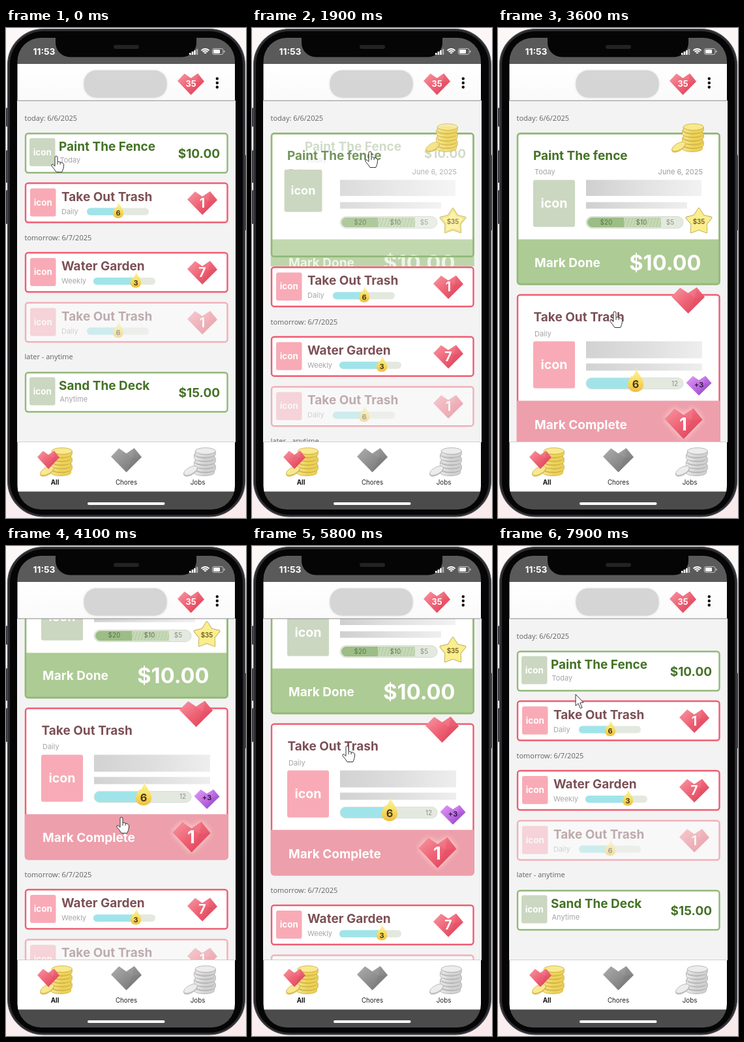
An HTML page with a canvas for the animation above (8 s loop, 368 by 750 pixels).

```html
<!DOCTYPE html>
<html lang="en">
<head>
<meta charset="utf-8">
<title>Chores app</title>
<style>
html, body { margin: 0; width: 100%; height: 100%; overflow: hidden; background: #fbf5f6; }
canvas { display: block; width: 368px; height: 750px; }
</style>
</head>
<body>
<canvas id="stage"></canvas>
<script>
const LOOP = 8000;
const canvas = document.getElementById('stage');
const ctx = canvas.getContext('2d');
const dpr = window.devicePixelRatio || 1;
canvas.width = 368 * dpr;
canvas.height = 750 * dpr;

const INTER = 'Inter, sans-serif';
const OPEN = '"Open Sans", sans-serif';
const RED = { light: '#f58a97', mid: '#ee6275', dark: '#e0485f' };
const GREY = { light: '#a6a6a6', mid: '#8f8f8f', dark: '#787878' };
const PURPLE = { light: '#d78ff0', mid: '#bd6ce2', dark: '#9a4ccb' };
const GOLD = { top: '#f8e98f', face: '#edd255', line: '#cbab45' };
const SILVER = { top: '#ececec', face: '#d2d2d2', line: '#ababab' };
const GREEN = { border: '#92b878', icon: '#cbd7c1', title: '#447226', band: '#adcb94' };
const PINK = { border: '#ee5d72', icon: '#f8abb6', title: '#7c5056', band: '#ed9fab' };
const PAGE = '#f3f3f3';
const TITLE = 19, BIG = 32.6;

// ---------- timing ----------
const clamp = v => Math.max(0, Math.min(1, v));
const mix = (a, b, p) => a + (b - a) * p;
const easeOut = p => 1 - (1 - p) * (1 - p);
const smooth = p => p * p * (3 - 2 * p);
const linear = p => p;

function track(t, keys, ease) {
  for (let i = 1; i < keys.length; i++) {
    const [t0, a] = keys[i - 1], [t1, b] = keys[i];
    if (t <= t1) return mix(a, b, ease(clamp((t - t0) / (t1 - t0))));
  }
  return keys[keys.length - 1][1];
}

const jobOpen = t => track(t, [[1700, 0], [2100, 1], [7250, 1], [7650, 0]], easeOut);
const choreOpen = t => track(t, [[3100, 0], [3500, 1], [5900, 1], [6300, 0]], easeOut);
function scrollAt(t) {
  if (t > 6400) return track(t, [[6400, 136], [7080, 0]], linear);
  return track(t, [[3700, 0], [4100, 160], [4500, 200], [4800, 200], [5400, 136]], smooth);
}
const pointerX = t => track(t, [[200, 77], [1400, 181], [2300, 181], [2800, 179], [3600, 179],
  [4100, 177], [4800, 177], [5500, 146], [6300, 146], [6800, 129], [7300, 129], [7800, 119]], smooth);
const pointerY = t => track(t, [[200, 196], [1400, 189], [2300, 189], [2800, 434], [3600, 434],
  [4100, 415], [4800, 415], [5500, 306], [6300, 306], [6800, 229], [7300, 229], [7800, 227]], smooth);

// ---------- drawing helpers ----------
function text(s, x, y, size, color, weight = 400, align = 'left', family = INTER) {
  ctx.font = `${weight} ${size}px ${family}`;
  ctx.textAlign = align;
  ctx.fillStyle = color;
  ctx.fillText(s, x, y);
}
const bold = (s, x, y, size, color, align) => text(s, x, y, size, color, 700, align);

function box(x, y, w, h, r, fill, stroke, lw = 1) {
  ctx.beginPath();
  ctx.roundRect(x, y, w, h, r);
  if (fill) { ctx.fillStyle = fill; ctx.fill(); }
  if (stroke) { ctx.strokeStyle = stroke; ctx.lineWidth = lw; ctx.stroke(); }
}
function poly(points, fill) {
  ctx.beginPath();
  points.forEach(([x, y]) => ctx.lineTo(x, y));
  ctx.closePath();
  ctx.fillStyle = fill;
  ctx.fill();
}
function fade(x0, y0, x1, y1, ...colors) {
  const g = ctx.createLinearGradient(x0, y0, x1, y1);
  colors.forEach((c, i) => g.addColorStop(i / (colors.length - 1), c));
  return g;
}
function withAlpha(a, draw) {
  if (a <= 0) return;
  ctx.save();
  ctx.globalAlpha *= a;
  draw();
  ctx.restore();
}

function heart(cx, cy, w, h, pal, glow) {
  const at = (x, y) => [cx + x * w, cy + y * h];
  const L = at(-.5, -.15), A = at(-.24, -.49), N = at(0, -.28), B = at(.26, -.5),
    R = at(.5, -.13), P = at(0, .5), Q = at(.2, -.1);
  ctx.save();
  if (glow) { ctx.shadowColor = 'rgba(255,225,215,.95)'; ctx.shadowBlur = 10 * dpr; }
  poly([L, A, N, B, R, P], fade(...A, ...at(.3, .4), pal.light, pal.mid, pal.dark));
  ctx.shadowBlur = 0;
  ctx.globalAlpha *= .3;
  poly([N, B, Q], pal.light);
  poly([Q, R, P], pal.dark);
  ctx.restore();
}

function coins(x, y, pal) {
  ctx.lineWidth = .8;
  ctx.strokeStyle = pal.line;
  for (let i = 5; i >= 0; i--) {
    const cx = x + 33 + (i % 2 ? -1 : .8), cy = y + 6 + i * 5.6;
    ctx.beginPath();
    ctx.ellipse(cx, cy, 15.5, 5, 0, Math.PI, 0, true);
    ctx.lineTo(cx + 15.5, cy + 5);
    ctx.ellipse(cx, cy + 5, 15.5, 5, 0, 0, Math.PI);
    ctx.closePath();
    ctx.fillStyle = fade(x + 17, 0, x + 49, 0, pal.top, pal.face, pal.face);
    ctx.fill();
    ctx.stroke();
    ctx.beginPath();
    ctx.ellipse(cx, cy, 15.5, 5, 0, 0, 7);
    ctx.fillStyle = pal.top;
    ctx.fill();
    ctx.stroke();
  }
  for (const [d, c] of [[1.5, pal.face], [0, pal.top]]) {
    ctx.beginPath();
    ctx.ellipse(x + 11, y + 36 + d, 11.5, 5.2, -.5, 0, 7);
    ctx.fillStyle = c;
    ctx.fill();
    ctx.stroke();
  }
}

function flame(x, y, s, label) {
  ctx.save();
  ctx.translate(x, y);
  ctx.scale(s, s);
  ctx.beginPath();
  ctx.moveTo(1, -14);
  ctx.bezierCurveTo(1, -9, 8.2, -5, 8.2, 3);
  ctx.bezierCurveTo(8.2, 13, -8.2, 13, -8.2, 3);
  ctx.bezierCurveTo(-8.2, -1, -5.5, -3, -4.5, -6);
  ctx.bezierCurveTo(-3, -4, -1, -8, 1, -14);
  ctx.fillStyle = fade(0, -13, 0, 11, '#fbf3a4', '#f8df62', '#efbb45');
  ctx.fill();
  ctx.restore();
  bold(label, x, y + 6.6 * s, 11 * s, '#453913', 'center');
}

function star(cx, cy, r) {
  ctx.beginPath();
  for (let i = 0; i < 10; i++) {
    const a = i * Math.PI / 5 - Math.PI / 2, q = i % 2 ? r * .58 : r;
    ctx.lineTo(cx + q * Math.cos(a), cy + q * Math.sin(a));
  }
  ctx.closePath();
  ctx.lineJoin = 'round';
  ctx.strokeStyle = '#b5a257';
  ctx.lineWidth = 3;
  ctx.stroke();
  ctx.strokeStyle = ctx.fillStyle = '#fbee8c';
  ctx.lineWidth = 1.4;
  ctx.fill();
  ctx.stroke();
}

function streak(x, y, w, h, part) {
  box(x, y, w, h, h / 2, '#e4e9df');
  box(x, y, part, h, [h / 2, 0, 0, h / 2], '#a0e4ea');
}

function icon(y, p, pal, x0, y0) {
  const w = mix(39.5, 64, p), h = mix(43, 72, p);
  const x = mix(x0, 54, p), top = y + mix(y0, 72, p);
  box(x, top, w, h, 3, pal.icon);
  const size = mix(13.4, 19.6, p);
  bold('icon', x + w / 2, top + h / 2 + size * .35, size, '#fff', 'center');
}

// ---------- cards ----------
function card(y, p, pal, small, large) {
  const h = mix(62, 232.5, p);
  const border = () => box(30, y + 1, 309.5, h - 2, 4, null, pal.border, 2.4);
  box(30, y + 1, 309.5, h - 2, 4, '#fff');
  border();
  withAlpha(1 - p, small);
  if (p > 0) {
    ctx.save();
    ctx.beginPath();
    ctx.rect(17, y - 30, 335, 30 + h + (p < 1 ? 14 : 1));
    ctx.clip();
    withAlpha(p, () => {
      box(28.8, y + 163, 311.9, 70, [0, 0, 5, 5], pal.band);
      large();
    });
    if (pal === GREEN) border();
    withAlpha(p, () => pal === GREEN ? coins(266, y - 15, GOLD) : heart(291.5, y + 9.5, 51, 40, RED));
    ctx.restore();
  }
}

function job(y, p, title, when, pay) {
  card(y, p, GREEN, () => {
    bold(title, 81, y + 27, TITLE, GREEN.title);
    text(when, 82.5, y + 45, 11, '#a5a5a5');
    bold(pay, 328, y + 38, TITLE, GREEN.title, 'right');
  }, () => {
    bold('Paint The fence', 54, y + 41, TITLE, GREEN.title);
    text(when, 56, y + 63, 11, '#a5a5a5');
    text('June 6, 2025', 314, y + 63, 11, '#999', 400, 'right');
    ctx.fillStyle = fade(135, 0, 312, 0, '#cfcfcf', '#e2e2e2', '#f2f2f2');
    ctx.fillRect(135, y + 72, 177, 24.5);
    ctx.fillRect(135, y + 106, 155, 10);
    box(135, y + 128, 149, 18, 9, '#e4e9df', '#d5dccf', 1);
    box(137, y + 129.5, 56, 15, [7.5, 0, 0, 7.5], '#9cbd85');
    box(193, y + 129.5, 57, 15, 0, '#c6d9b8');
    ctx.save();
    ctx.clip();
    ctx.strokeStyle = '#b4cda3';
    ctx.lineWidth = 1.4;
    for (let x = 192; x < 256; x += 5) {
      ctx.beginPath();
      ctx.moveTo(x, y + 145);
      ctx.lineTo(x + 5, y + 129);
      ctx.stroke();
    }
    ctx.restore();
    text('$20', 166, y + 140, 10, '#5e7350', 400, 'center');
    text('$10', 220, y + 140, 10, '#5e7350', 400, 'center');
    text('$5', 264, y + 140, 10, '#8a9483', 400, 'center');
    star(308, y + 136, 20);
    text('$35', 308, y + 139.5, 9.8, '#6a5a20', 600, 'center');
    bold('Mark Done', 56, y + 205, TITLE, '#fff');
    bold(pay, 311.5, y + 210, BIG, '#fff', 'right');
  });
  icon(y, p, GREEN, 36, 8);
}

function chore(y, p, title, when, barX, part, days, gems) {
  card(y, p, PINK, () => {
    bold(title, 85, y + 28, TITLE, PINK.title);
    text(when, 85, y + 48, 11, '#a5a5a5');
    streak(barX, y + 39, 95, 11, part);
    flame(barX + part, y + 44, 1, days);
    heart(301, y + 31.5, 46, 36, RED);
    bold(gems, 301, y + 38, 19.5, '#fff', 'center');
  }, () => {
    bold(title, 54.5, y + 41.5, TITLE, PINK.title);
    text(when, 56, y + 64, 11, '#a5a5a5');
    ctx.fillStyle = fade(135, 0, 313, 0, '#d2d2d2', '#dedede', '#eeeeee');
    ctx.fillRect(135, y + 72, 178, 26);
    ctx.fillRect(135, y + 106, 178, 11);
    streak(135, y + 128, 149, 17, 75);
    box(135, y + 128, 149, 17, 8.5, null, '#d8e0d8', 1);
    flame(211, y + 134, 1.48, days);
    text('12', 271, y + 140, 10, '#8f8f8f', 400, 'center');
    heart(308, y + 140, 39, 30, PURPLE);
    text('+3', 308, y + 142, 11, '#2b1638', 600, 'center');
    bold('Mark Complete', 56, y + 206, TITLE, '#fff');
    heart(284.5, y + 198, 58, 47, RED, true);
    bold(gems, 284, y + 208, 27.5, '#fff', 'center');
  });
  icon(y, p, PINK, 37, 9);
}

const section = (s, y) => text(s, 28.5, y, 11, '#626262', 400, 'left', OPEN);

function list(t) {
  const a = jobOpen(t), b = choreOpen(t);
  ctx.save();
  ctx.beginPath();
  ctx.rect(17, 111, 335, 523);
  ctx.clip();
  ctx.fillStyle = PAGE;
  ctx.fillRect(17, 111, 335, 523);
  ctx.translate(0, -scrollAt(t));
  section('today: 6/6/2025', 142);
  job(160.5, a, 'Paint The Fence', 'Today', '$10.00');
  const s = 171 * a;
  chore(236.5 + s, b, 'Take Out Trash', 'Daily', 124, 48, '6', '1');
  const u = s + 171 * b;
  section('tomorrow: 6/7/2025', 325 + u);
  chore(343 + u, 0, 'Water Garden', 'Weekly', 134, 65, '3', '7');
  // a veil dims the locked chore evenly
  chore(419.5 + u, 0, 'Take Out Trash', 'Daily', 124, 48, '6', '1');
  withAlpha(.56, () => box(28, 418.5 + u, 313.5, 64, 5, PAGE));
  section('later - anytime', 507 + u);
  job(526.5 + u, 0, 'Sand The Deck', 'Anytime', '$15.00');
  ctx.restore();
}

// ---------- phone ----------
function body() {
  ctx.fillStyle = fade(0, 0, 368, 750, '#fdf8f8', '#fbf5f6', '#f9e9eb');
  ctx.fillRect(0, 0, 368, 750);
  for (const [y, h] of [[122, 29], [187, 50], [248, 52]]) box(0, y, 5, h, 1.5, '#3a3a40');
  box(363, 194, 5, 116, 1.5, '#3a3a40');
  box(2.5, 1.5, 364, 746.5, 55, '#2b2b30', '#4b4b51', 1.2);
  box(6, 5, 357, 740, 51, '#050506');
}

function chrome() {
  ctx.save();
  ctx.beginPath();
  ctx.roundRect(17.5, 15, 333.5, 722, 36);
  ctx.clip();
  ctx.fillStyle = '#5a5a5a';
  ctx.fillRect(17, 15, 335, 41);
  ctx.fillStyle = fade(0, 55, 0, 111, '#ffffff', '#fbfafa');
  ctx.fillRect(17, 55, 335, 56);
  ctx.fillStyle = '#8c8c8c';
  ctx.fillRect(17, 110.7, 335, 1);
  ctx.fillStyle = '#fff';
  ctx.fillRect(17, 633, 335, 77);
  ctx.fillStyle = '#cfcfcf';
  ctx.fillRect(17, 633, 335, 1);
  ctx.fillStyle = '#4b4b4b';
  ctx.fillRect(17, 709.5, 335, 28);
  ctx.restore();

  box(76, 10, 216, 34.5, [0, 0, 22, 22], '#050506');
  box(165, 26, 39, 6, 3, '#232326');
  bold('11:53', 41.5, 41.2, 13.8, '#fff');
  for (let i = 0; i < 4; i++) box(281 + i * 3.6, 38 - i * 2, 2.5, 3 + i * 2, .6, i < 3 ? '#fff' : '#aaa');
  ctx.strokeStyle = '#fff';
  ctx.lineWidth = 1.8;
  for (const r of [2, 5, 8]) {
    ctx.beginPath();
    ctx.arc(305.5, 40, r, -Math.PI * .77, -Math.PI * .23);
    ctx.stroke();
  }
  box(316.5, 31.5, 16.5, 9, 2.5, null, '#c4c4c4', 1);
  box(318, 33, 10, 6, 1.2, '#fff');
  box(334, 34.5, 1.5, 3, .7, '#c4c4c4');

  ctx.save();
  ctx.shadowColor = '#d2d2d2';
  ctx.shadowBlur = 3 * dpr;
  box(119.5, 65, 127, 41.5, 19, '#d5d5d5');
  ctx.restore();
  heart(283.5, 86, 41, 33, RED);
  bold('35', 283.5, 89.5, 12.6, '#fff', 'center');
  for (const y of [77.5, 84, 90.5]) box(321.6, y - 2.2, 4.4, 4.4, 2.2, '#111');

  coins(52, 641.5, GOLD);
  heart(65, 661, 34, 28, RED);
  heart(184.5, 661.5, 47, 37, GREY);
  coins(272, 641.5, SILVER);
  bold('All', 75, 698.5, 9.8, '#111', 'center');
  text('Chores', 184.5, 698.5, 9.8, '#222', 400, 'center');
  text('Jobs', 294, 698.5, 9.8, '#222', 400, 'center');
  box(125, 726, 118.5, 4, 2, '#fff');
}

const HAND = new Path2D('M-2 2Q-2 0 0 0Q2 0 2 2L2 9Q5.5 7.6 6.2 9.8Q9 8.8 9.5 11Q12.3 10.6 11.5 15L10.8 19.5L8.8 24.5L0 24.5Q-3.5 19-6.8 15.5Q-7.8 12-4.8 13L-2 15.5Z');
const ARROW = new Path2D('M0 0L0 17.5L4 14L7.2 21.5L10 20.3L6.8 13L12 12.6Z');
function pointer(t) {
  const idle = t > 7250 && jobOpen(t) < .05;
  const shape = idle ? ARROW : HAND;
  ctx.save();
  ctx.translate(pointerX(t), pointerY(t));
  ctx.lineJoin = 'round';
  ctx.lineWidth = 1;
  ctx.fillStyle = '#fff';
  ctx.strokeStyle = '#333';
  ctx.fill(shape);
  ctx.stroke(shape);
  if (!idle) {
    ctx.beginPath();
    for (const x of [2, 6.1]) { ctx.moveTo(x, 9.5); ctx.lineTo(x, 13); }
    ctx.stroke();
  }
  ctx.restore();
}

function frame() {
  const t = performance.now() % LOOP;
  ctx.setTransform(dpr, 0, 0, dpr, 0, 0);
  body();
  list(t);
  chrome();
  pointer(t);
  requestAnimationFrame(frame);
}
frame();
</script>
</body>
</html>
```
